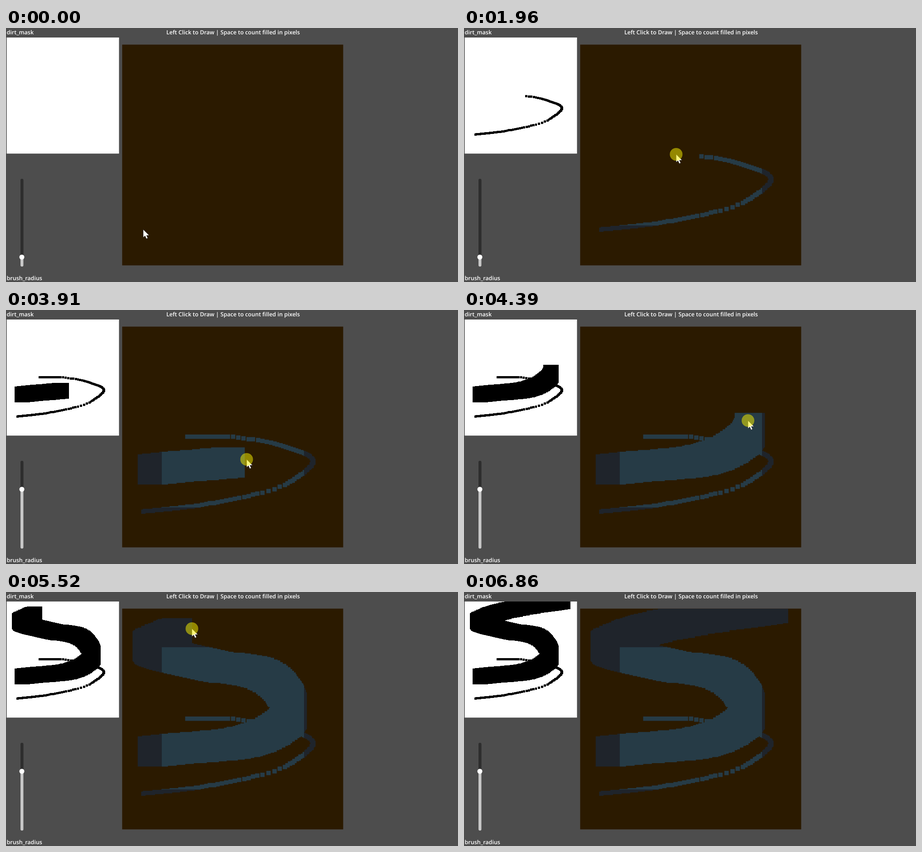
These frames come from a looping animation (998 by 561 pixels, 8.18 s). An HTML page:

```html
<!DOCTYPE html>
<html lang="en">
<head>
<meta charset="utf-8">
<title>Dirt mask</title>
<style>
  html, body { margin: 0; width: 100%; height: 100%; overflow: hidden; background: #4d4d4d; }
  svg { display: block; width: 998px; height: 561px; }
  text { font: 600 12.55px "Open Sans", "Noto Sans", sans-serif; fill: #fff; text-rendering: geometricPrecision; }
  .crisp { shape-rendering: crispEdges; }
</style>
</head>
<body>
<svg viewBox="0 0 998 561">
  <defs>
    <clipPath id="cleaned" class="crisp"><path id="holes" class="crisp" transform="translate(256.5 36.7) scale(1.90625)"/></clipPath>
  </defs>
  <rect width="998" height="561" fill="#4d4d4d"/>
  <text x="1.5" y="14">dirt_mask</text>
  <text x="354" y="14">Left Click to Draw | Space to count filled in pixels</text>
  <text x="1.5" y="557">brush_radius</text>

  <rect x="1.5" y="21" width="248" height="256.4" fill="#fff"/>
  <path id="mask" class="crisp" transform="translate(1.5 21) scale(.96875 1)"/>

  <rect x="256.5" y="36.7" width="488" height="487.6" fill="#2b1a00"/>
  <g clip-path="url(#cleaned)">
    <rect x="256.5" y="36.7" width="488" height="487.6" fill="#1f242b"/>
    <rect x="344" y="122" width="314" height="314" fill="#263b46"/>
  </g>

  <rect x="32" y="333" width="6.5" height="194" rx="3.2" fill="#2d2d2d"/>
  <rect id="level" x="32" width="6.5" rx="3.2" fill="#c8c8c8"/>
  <circle id="knob" cx="35" r="5.5" fill="#fff"/>

  <g id="pointer">
    <path d="M0 0V17.5L4 14L7 20.5L10 19L7.2 13H13Z" fill="#fff" stroke="#222" stroke-width=".6"/>
    <circle id="press" r="14" fill="#f5ee00" fill-opacity=".52"/>
  </g>
</svg>
<script>
const LOOP = 8180, GONE = 6860, LAG = 80, STEP = 1000 / 60, TEXEL = 1.90625;
const $ = id => document.getElementById(id);

// Turning points of the pointer: time, x, y
const keys = [
  // thin line
  [380, 303, 445], [780, 407, 434], [1060, 555, 406], [1160, 622, 383],
  [1440, 678, 334], [1740, 600, 297], [1960, 469, 279], [2090, 400, 279],
  // slider
  [2690, 35, 506], [2840, 34, 465], [3070, 35, 396],
  // wide line
  [3500, 324, 352], [3910, 531, 330], [4280, 632, 264], [4560, 607, 213], [4730, 553, 177],
  [4880, 451, 162], [5240, 313, 119], [5340, 350, 101], [5520, 410, 81], [5850, 682, 36],
  // off the stage
  [6030, 780, 27], [6210, 841, 66], [GONE, 955, 575]
];
const strokes = [
  { from: 380, to: 2090, radius: 2 },
  { from: 3500, to: 5850, radius: 17 }
];
const drag = { from: 2690, to: 3070 };
const clamp = (v, lo, hi) => Math.min(Math.max(v, lo), hi);

function rate(i, axis) {
  const a = keys[i], b = keys[i + 1];
  return (b[axis] - a[axis]) / (b[0] - a[0]);
}

// Harmonic mean of both sides, zero at a turn, so the curve never overshoots
function slope(i, axis) {
  if (i === 0) return rate(0, axis);
  if (i === keys.length - 1) return rate(i - 1, axis);
  const p = rate(i - 1, axis), q = rate(i, axis);
  return p * q > 0 ? 2 * p * q / (p + q) : 0;
}

function pointerAt(time) {
  const t = clamp(time, keys[0][0], GONE);
  const next = keys.findIndex(k => k[0] > t);
  const i = next < 0 ? keys.length - 2 : next - 1;
  const a = keys[i], b = keys[i + 1], span = b[0] - a[0];
  const u = (t - a[0]) / span, v = 1 - u;
  return [1, 2].map(n =>
    v * v * (1 + 2 * u) * a[n] + u * u * (3 - 2 * u) * b[n]
    + span * u * v * (v * slope(i, n) - u * slope(i + 1, n)));
}

// Brush stamps, snapped to the 256 x 256 mask
const stamps = strokes.flatMap(({ from, to, radius }) => {
  const count = Math.round((to - from) / STEP), size = 2 * radius + 1;
  return Array.from({ length: count + 1 }, (_, n) => {
    const t = from + (to - from) * n / count;
    const [x, y] = pointerAt(t);
    const left = Math.floor((x - 256.5) / TEXEL) - radius;
    const top = Math.floor((y - 36.7) / TEXEL) - radius;
    return { time: t + LAG, d: `M${left} ${Math.max(top, 0)}h${size}V${top + size}h${-size}z` };
  });
});

function draw(t) {
  const d = stamps.filter(s => s.time <= t).map(s => s.d).join("");
  $("mask").setAttribute("d", d);
  $("holes").setAttribute("d", d);

  const level = pointerAt(clamp(t - LAG, drag.from, drag.to))[1];
  $("knob").setAttribute("cy", level);
  $("level").setAttribute("y", level);
  $("level").setAttribute("height", 527 - level);

  const [x, y] = pointerAt(t);
  const pressed = [...strokes, drag].some(s => t >= s.from && t < s.to);
  $("pointer").setAttribute("transform", `translate(${x} ${y})`);
  $("pointer").setAttribute("visibility", t < GONE ? "visible" : "hidden");
  $("press").setAttribute("display", pressed ? "inline" : "none");
}

const start = performance.now();
function tick() {
  draw((performance.now() - start) % LOOP);
  requestAnimationFrame(tick);
}
tick();
</script>
</body>
</html>
```
